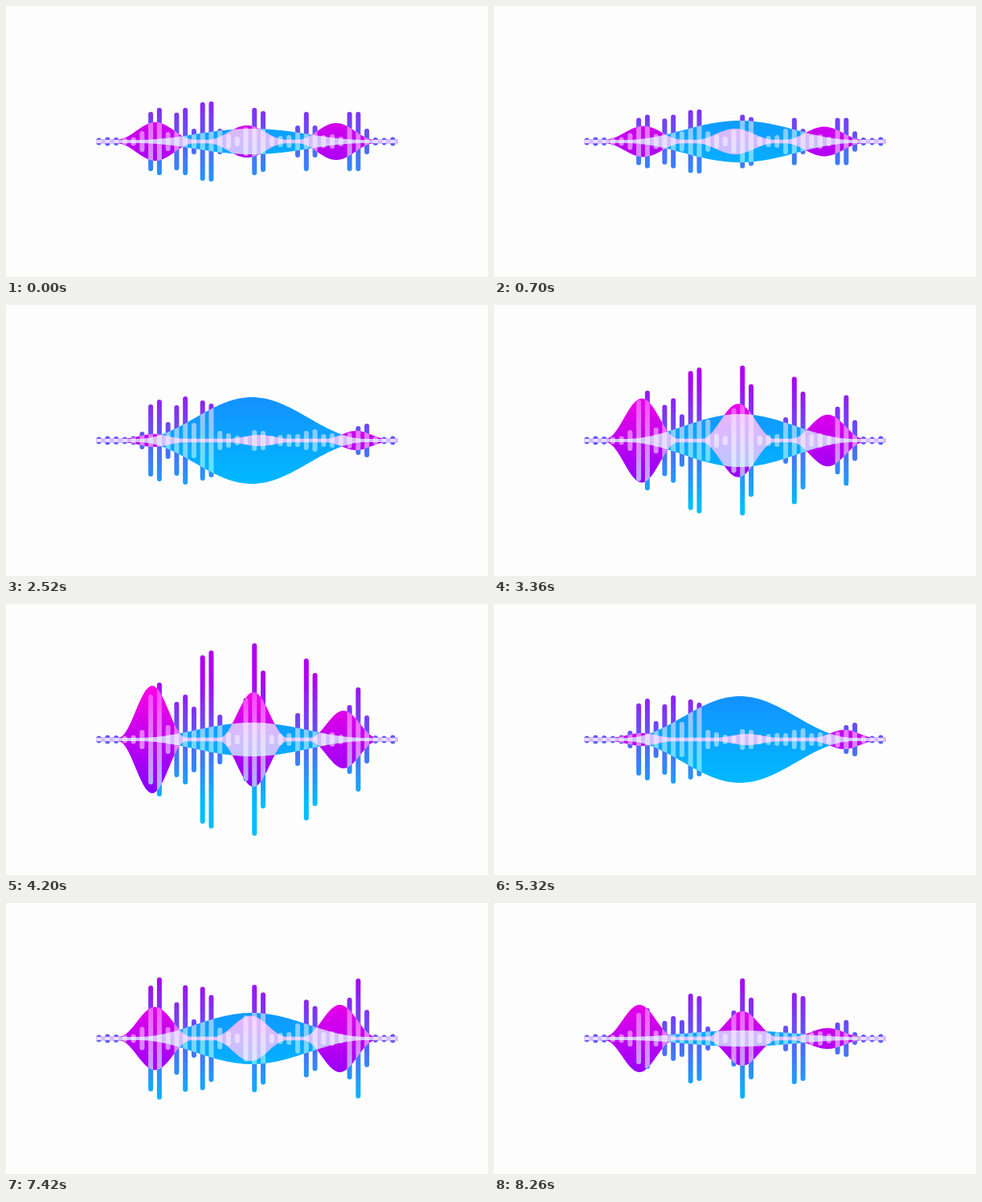
An HTML page with a canvas that plays this animation: 600x338 px, repeating every 8400 ms.

```html
<!DOCTYPE html>
<html lang="en">
<head>
<meta charset="utf-8">
<title>Sound wave</title>
<style>
html, body { margin: 0; width: 600px; height: 338px; overflow: hidden; background: #fdfdfd; }
canvas { display: block; }
</style>
</head>
<body>
<canvas id="stage" width="600" height="338"></canvas>
<script>
const ctx = document.getElementById('stage').getContext('2d');
const MID = 169, LEFT = 112, RIGHT = 488;
const STEP = 140, STEPS = 20, BARS = 35;

// Bars that follow the sound; the others stay small.
const LIVE = [5, 6, 7, 8, 9, 10, 11, 12, 13, 14, 17, 18, 19, 23, 24, 25, 29, 30, 31];

// bars: half heights of LIVE; lobes: half heights; at: lobe centres; w: lobe reach
const POSES = {
  soft: {
    bars: [13, 37, 42, 12, 36, 42, 16, 49, 50, 16, 18, 42, 38, 20, 37, 20, 37, 37, 16],
    lobes: [24, 20, 23], at: [186, 300, 411], w: 48
  },
  centre: {
    bars: [12, 56, 71, 18, 47, 56, 41, 105, 111, 31, 52, 120, 86, 33, 101, 83, 43, 65, 30],
    lobes: [67, 59, 36], at: [182, 308, 420], w: 42
  },
  left: {
    bars: [11, 45, 51, 23, 44, 55, 22, 50, 46, 12, 5, 13, 12, 8, 12, 14, 10, 18, 21],
    lobes: [8, 7, 12], at: [184, 315, 436], w: 38
  },
  sides: {
    bars: [18, 94, 109, 18, 59, 92, 33, 85, 67, 15, 40, 93, 79, 22, 64, 59, 68, 109, 53],
    lobes: [55, 38, 60], at: [185, 309, 420], w: 42
  },
  half: {
    bars: [10, 32, 38, 10, 22, 28, 23, 56, 53, 15, 35, 75, 51, 16, 57, 53, 20, 23, 8],
    lobes: [42, 34, 13], at: [181, 309, 415], w: 43
  }
};

// step, pose, loudness, half height of the blue wave
const KEYS = [
  [0, 'soft', 1, 16], [3, 'centre', 1.28, 40], [5, 'soft', 0.8, 26],
  [7, 'sides', 1, 30], [9, 'centre', 1.07, 24], [10, 'centre', 1, 21],
  [12, 'soft', 0.6, 44], [14, 'sides', 1.17, 20], [16, 'centre', 0.83, 34],
  [18, 'left', 1, 54], [19, 'half', 1, 10], [20, 'soft', 1, 16]
];

const mix = (a, b, u) => a + (b - a) * u;
const mixAll = (a, b, u) => a.map((v, i) => mix(v, b[i], u));

function gradient(y0, c0, y1, c1) {
  const g = ctx.createLinearGradient(0, y0, 0, y1);
  g.addColorStop(0, c0);
  g.addColorStop(1, c1);
  return g;
}
const BAR_FILL = gradient(90, 'rgb(175,0,240)', 250, 'rgb(0,190,255)');
const PINK_FILL = gradient(100, 'rgb(255,0,225)', 238, 'rgb(130,0,255)');
const BLUE_FILL = gradient(115, 'rgb(20,145,255)', 223, 'rgb(0,185,255)');

function keyPose([, name, k, blue]) {
  const p = POSES[name];
  return {
    bars: p.bars.map(v => v * k), lobes: p.lobes.map(v => v * k),
    at: p.at, w: p.w, blue
  };
}

function poseAt(step) {
  const n = KEYS.findIndex(k => k[0] > step);
  const from = KEYS[n - 1], to = KEYS[n];
  const u = (step - from[0]) / (to[0] - from[0]);
  const a = keyPose(from), b = keyPose(to);
  return {
    bars: mixAll(a.bars, b.bars, u), lobes: mixAll(a.lobes, b.lobes, u),
    at: mixAll(a.at, b.at, u), w: mix(a.w, b.w, u), blue: mix(a.blue, b.blue, u)
  };
}

const bell = (d, w) => Math.abs(d) < w ? Math.cos(Math.PI * d / (2 * w)) ** 2 : 0;

function wavePath(half) {
  const path = new Path2D();
  for (let x = LEFT; x <= RIGHT; x += 2) path.lineTo(x, MID - half(x));
  for (let x = RIGHT; x >= LEFT; x -= 2) path.lineTo(x, MID + half(x));
  path.closePath();
  return path;
}

function barsPath(live) {
  const path = new Path2D();
  for (let i = 0; i < BARS; i++) {
    const n = LIVE.indexOf(i);
    const inner = i > 14 && i < 29;
    const h = n >= 0 ? live[n] : inner ? 6 + i * 5 % 4 : 4.5 + i * 5 % 3 / 2;
    path.roundRect(112.6 + 10.76 * i, MID - h, 6, 2 * h, 3);
  }
  return path;
}

function screenFill(path, fill) {
  ctx.globalCompositeOperation = 'screen';
  ctx.fillStyle = fill;
  ctx.fill(path);
}

// Brightens the area shared by two paths.
function lighten(a, b, alpha) {
  ctx.save();
  ctx.globalCompositeOperation = 'source-over';
  ctx.clip(a);
  ctx.fillStyle = `rgba(255,255,255,${alpha})`;
  ctx.fill(b);
  ctx.restore();
}

function draw(step) {
  const p = poseAt(step);
  const bars = barsPath(p.bars);
  const pink = wavePath(x =>
    2.3 + p.lobes.reduce((sum, h, i) => sum + (h - 2.3) * bell(x - p.at[i], p.w), 0));
  const blue = wavePath(x => 2 + (p.blue - 2) * bell(x - 306, 142));
  const waves = new Path2D(pink);
  waves.addPath(blue);

  ctx.clearRect(0, 0, 600, 338);
  screenFill(bars, BAR_FILL);
  screenFill(pink, PINK_FILL);
  screenFill(blue, BLUE_FILL);
  lighten(pink, blue, 0.25);
  lighten(waves, bars, 0.2);
}

let start, shown = -1;
function tick(now) {
  start ??= now;
  const step = Math.floor((now - start) / STEP + 0.001) % STEPS;
  if (step !== shown) draw(shown = step);
  requestAnimationFrame(tick);
}
draw(0);
requestAnimationFrame(tick);
</script>
</body>
</html>
```
